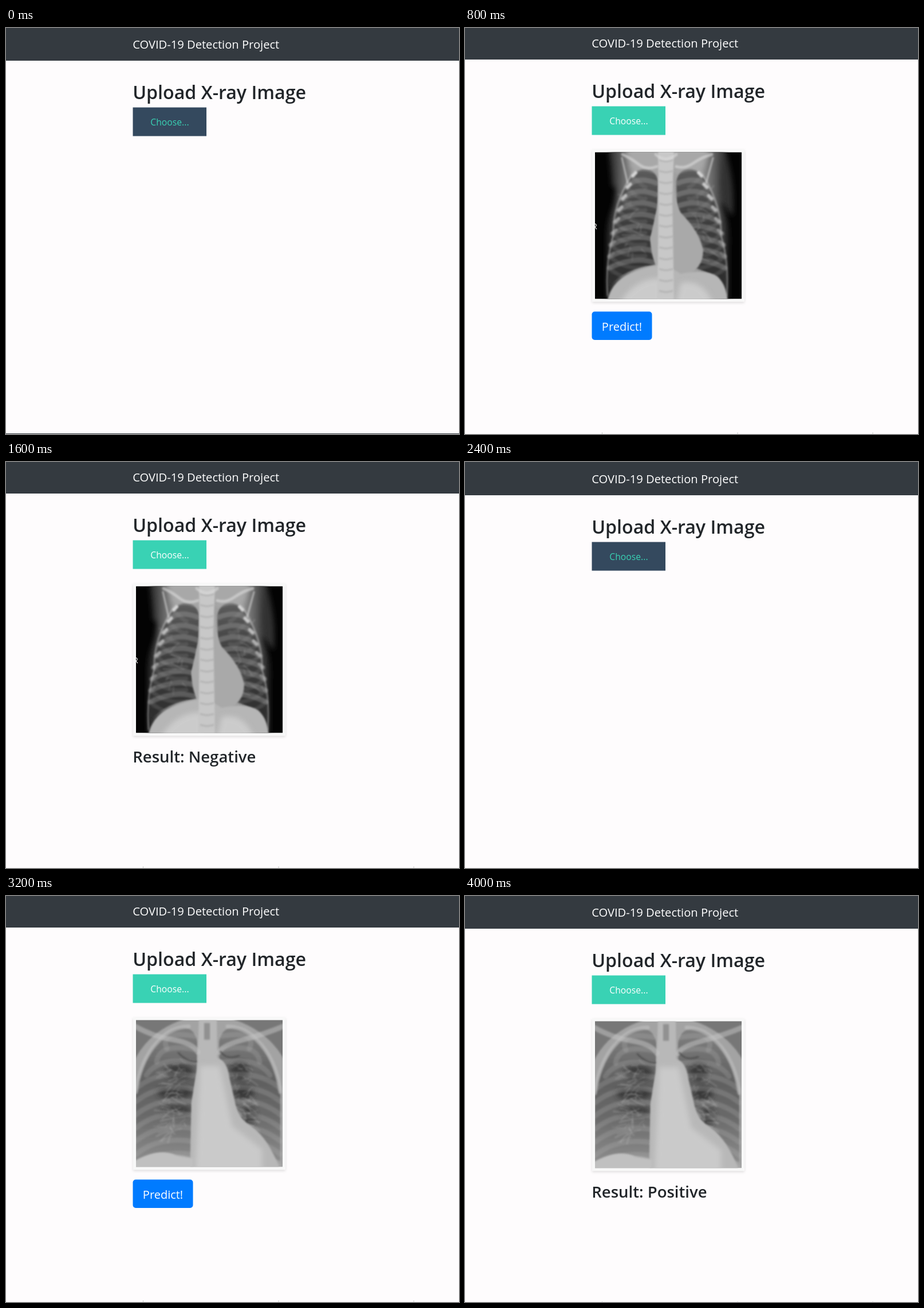
Animation of 791x708 px, one loop 4800 ms. Source, as an HTML page:

```html
<!DOCTYPE html>
<html lang="en">
<head>
<meta charset="utf-8">
<title>X-ray detection demo</title>
<style>
  html, body { margin: 0; width: 100%; height: 100%; overflow: hidden; background: #fefcfd; }
  svg { display: block; }
  text { font-family: "Open Sans", "Noto Sans", sans-serif; white-space: pre; }
  .heading { font-weight: 600; fill: #212529; }
  .card { fill: #f8f8f8; filter: drop-shadow(0 2px 2px rgba(0, 0, 0, .12)); }
  .soft { filter: url(#soft); }
  .softer { filter: url(#softer); }
  .line { fill: none; stroke-linecap: round; }
</style>
</head>
<body>
<svg width="791" height="708" viewBox="0 0 791 708">
  <defs>
    <filter id="soft" x="-20%" y="-20%" width="140%" height="140%"><feGaussianBlur stdDeviation="1.5"/></filter>
    <filter id="softer" x="-30%" y="-30%" width="160%" height="160%"><feGaussianBlur stdDeviation="5"/></filter>
    <clipPath id="frame"><rect width="256" height="256"/></clipPath>
    <linearGradient id="torso">
      <stop offset="0" stop-color="#181818"/><stop offset=".08" stop-color="#484848"/>
      <stop offset=".25" stop-color="#a0a0a0"/><stop offset=".75" stop-color="#a0a0a0"/>
      <stop offset=".92" stop-color="#484848"/><stop offset="1" stop-color="#181818"/>
    </linearGradient>
    <linearGradient id="lung" x2="0" y2="1">
      <stop offset="0" stop-color="#5c5c5c"/><stop offset=".4" stop-color="#404040"/><stop offset="1" stop-color="#2c2c2c"/>
    </linearGradient>
    <linearGradient id="hazy" x2="0" y2="1">
      <stop offset="0" stop-color="#808080"/><stop offset=".4" stop-color="#606060"/>
      <stop offset=".65" stop-color="#686868"/><stop offset="1" stop-color="#8c8c8c"/>
    </linearGradient>
  </defs>
  <rect width="791" height="708" fill="#fefcfd"/>
  <path id="ticks" d="M239.5 705v5M476 705v5M712 705v5" stroke="#ccc"/>
  <path id="edge" d="M0 707.5H791" stroke="#343a40"/>

  <g id="page">
    <rect y="-5" width="791" height="60" fill="#343a40"/>
    <text x="221.2" y="34.1" font-size="20.15" fill="#fff">COVID-19 Detection Project</text>
    <text class="heading" x="221.2" y="122" font-size="32.15">Upload X-ray Image</text>
    <rect id="choose" x="221.5" y="136.5" width="128.5" height="50"/>
    <text id="chooseLabel" x="286" y="168.2" font-size="15.7" text-anchor="middle">Choose...</text>

    <g id="preview">
      <rect class="card" x="222" y="211.5" width="266" height="266"/>
      <g transform="translate(227 216.5)" clip-path="url(#frame)">
        <g id="clear">
          <rect width="256" height="256" fill="#030303"/>
          <path class="softer" fill="#333" d="M24-10H226Q246 60 240 112L222 90 30 60Z"/>
          <path class="softer" fill="url(#torso)" d="M30-9H224Q212 60 224 100 238 130 234 170V270H20V160Q17 130 32 95 42 60 30-9Z"/>
          <path class="softer" fill="#a8a8a8" d="M52-10H202L188 32H64Z"/>
          <g class="sides"><path class="soft" fill="url(#lung)" d="M82 30Q107 28 110 52L109 94 97 150 107 196Q50 203 25 234 24 180 33 142 40 80 62 44 70 32 82 30Z"/></g>
          <g id="clearRibs" class="sides soft line"></g>
          <g id="clearVessels" class="soft line" stroke="#aaa" stroke-opacity=".25"></g>
          <path class="soft" fill="#a9a9a9" d="M112 45 137 50Q138 84 150 106 184 140 189 172 188 204 160 214L112 210Q96 180 97 150 106 120 110 90Z"/>
          <path class="soft" fill="#b6b6b6" d="M21 262Q28 222 72 207 100 197 122 196L150 212Q195 203 214 217 230 232 232 262Z"/>
          <path class="softer" fill="#d5d5d5" d="M40 268Q68 218 116 220V268ZM140 268 150 228Q190 220 208 268Z" opacity=".7"/>
          <path class="soft" fill="#c8c8c8" d="M110-5H138L135 80 138 260H109L111 80Z"/>
          <g id="vertebrae" class="soft line" stroke="#999" stroke-opacity=".4" stroke-width="3"></g>
          <g class="soft line" stroke="#ddd" stroke-opacity=".6" stroke-width="5">
            <path d="M48 4Q62 10 76 21T108 25M204 4Q188 8 172 19T142 25M106 4Q123 20 142 4"/>
            <path d="M47 10 57 54M206 10 194 54" stroke-width="3"/>
          </g>
          <text x="-5" y="134" font-size="14" fill="#fff">R</text>
        </g>
        <g id="cloudy">
          <rect width="256" height="256" fill="#a3a3a3"/>
          <path class="soft" fill="#777" d="M-5-5H95Q22 15-5 75ZM262-5H158Q232 15 262 75Z"/>
          <g class="sides"><path class="soft" fill="url(#hazy)" d="M80 13Q102 12 107 38L106 90 98 140 95 238Q40 226 0 246V130Q8 72 40 36 60 15 80 13Z"/></g>
          <g class="softer" fill="#282828" opacity=".7">
            <ellipse cx="75" cy="90" rx="25" ry="13"/><ellipse cx="68" cy="126" rx="31" ry="11"/>
            <ellipse cx="70" cy="157" rx="27" ry="8"/><ellipse cx="181" cy="88" rx="17" ry="16"/>
            <ellipse cx="188" cy="126" rx="18" ry="13"/><ellipse cx="197" cy="166" rx="13" ry="16"/>
          </g>
          <g id="cloudyRibs" class="sides soft line"></g>
          <g id="cloudyVessels" class="soft line" stroke="#bbb" stroke-opacity=".28"></g>
          <path class="soft" fill="#b8b8b8" d="M110-5H141L142 66Q159 70 163 100L174 148Q180 172 200 184 232 206 252 262H95L97 145 107 85Z"/>
          <path class="softer" fill="#cacaca" d="M112 80H146L168 185 220 225V262H104Z"/>
          <path class="soft" fill="#c0c0c0" d="M-5 262V247Q38 221 70 236L100 241V262Z"/>
          <path class="soft" fill="#777" d="M119 5H129V34H119Z" opacity=".6"/>
          <path class="soft line" stroke="#c6c6c6" stroke-opacity=".5" stroke-width="9" d="M-3 10Q28 28 64 34T108 56M259 10Q226 24 188 34T145 56"/>
          <path class="soft line" stroke="#444" stroke-opacity=".65" stroke-width="3" d="M74 57Q88 72 105 72M148 55Q158 70 180 62"/>
        </g>
      </g>
    </g>

    <g id="predict">
      <rect x="221.5" y="494.5" width="105" height="49.5" rx="5" fill="#007bff"/>
      <text x="274" y="528" font-size="20" fill="#fff" text-anchor="middle">Predict!</text>
    </g>
    <text id="result" class="heading" x="221.3" y="524" font-size="27.5"></text>
  </g>
</svg>
<script>
const el = id => document.getElementById(id);
const range = (n, make) => Array.from({ length: n }, (_, i) => make(i)).join('');

let seed = 7;
const random = () => (seed = seed * 16807 % 2147483647) / 2147483647;

// Fine branches fanning out from the root of each lung.
function vessels(count, y, reach) {
  return range(count, i => {
    const side = i % 2 ? 1 : -1;
    const x = 126 + side * (38 + random() * 35), top = y + (random() - .5) * 130;
    const dx = side * random() * reach, dy = (random() - .4) * 30;
    return `<path d="M${x} ${top}q${dx / 2} ${dy / 4} ${dx} ${dy}" stroke-width="${1 + random() * 2}"/>`;
  });
}

// Bright rib ends fade out towards the diaphragm.
el('clearRibs').innerHTML = range(9, i => {
  const x = 25 + 40 * (1 - i / 8) ** 2, y = 34 + i * 20;
  return `<path d="M107 ${y}Q70 ${y - 14} ${x} ${y + 8}" stroke="#aaa" stroke-opacity=".33" stroke-width="9"/>
    <path d="M${x} ${y + 8}Q${x + 26} ${y + 32} 88 ${y + 27}" stroke="#999" stroke-opacity=".18" stroke-width="7"/>
    <path d="M${x + 6} ${y + 2}l-5 5" stroke="#e6e6e6" stroke-opacity="${.85 - i * .1}" stroke-width="6"/>`;
}) + '<path d="M62 43Q30 95 32 145 18 190 22 250" stroke="#ccc" stroke-opacity=".45" stroke-width="3"/>';

el('cloudyRibs').innerHTML = range(10, i => {
  const y = 24 + i * 23;
  return `<path d="M${Math.max(0, 54 - i * 18)} ${y + 26}Q40 ${y - 7} 102 ${y + 4}" stroke="#bbb" stroke-opacity=".22" stroke-width="9"/>`;
}) + '<path d="M0 125Q8 66 42 34 62 12 92 11" stroke="#c4c4c4" stroke-opacity=".55" stroke-width="7"/>';

el('vertebrae').innerHTML = range(13, i => `<path d="M113 ${14 + i * 19}q11 4 22 0"/>`);
el('clearVessels').innerHTML = vessels(40, 120, 24);
el('cloudyVessels').innerHTML = vessels(130, 140, 26);

for (const group of document.querySelectorAll('.sides')) {
  const mirrored = document.createElementNS('http://www.w3.org/2000/svg', 'g');
  mirrored.setAttribute('transform', 'matrix(-1 0 0 1 252 0)');
  mirrored.innerHTML = group.innerHTML;
  group.append(mirrored);
}

const scenes = [
  { shift: 2, edge: true },
  { shift: 0, image: 'clear' },
  { shift: 0, image: 'clear', result: 'Negative' },
  { shift: 3 },
  { shift: 0, image: 'cloudy' },
  { shift: 2, image: 'cloudy', result: 'Positive' }
];
const show = (id, visible) => { el(id).style.display = visible ? '' : 'none'; };

function draw() {
  const { shift, edge, image, result } = scenes[Math.floor(performance.now() % 4800 / 800)];
  for (const id of ['page', 'ticks']) el(id).setAttribute('transform', `translate(0 ${shift})`);
  show('edge', edge);
  show('preview', image);
  show('clear', image === 'clear');
  show('cloudy', image === 'cloudy');
  show('predict', image && !result);
  el('result').textContent = result ? `Result: ${result}` : '';
  el('choose').setAttribute('fill', image ? '#39d2b4' : '#34495e');
  el('chooseLabel').setAttribute('fill', image ? '#fff' : '#39d2b4');
  requestAnimationFrame(draw);
}
draw();
</script>
</body>
</html>
```
